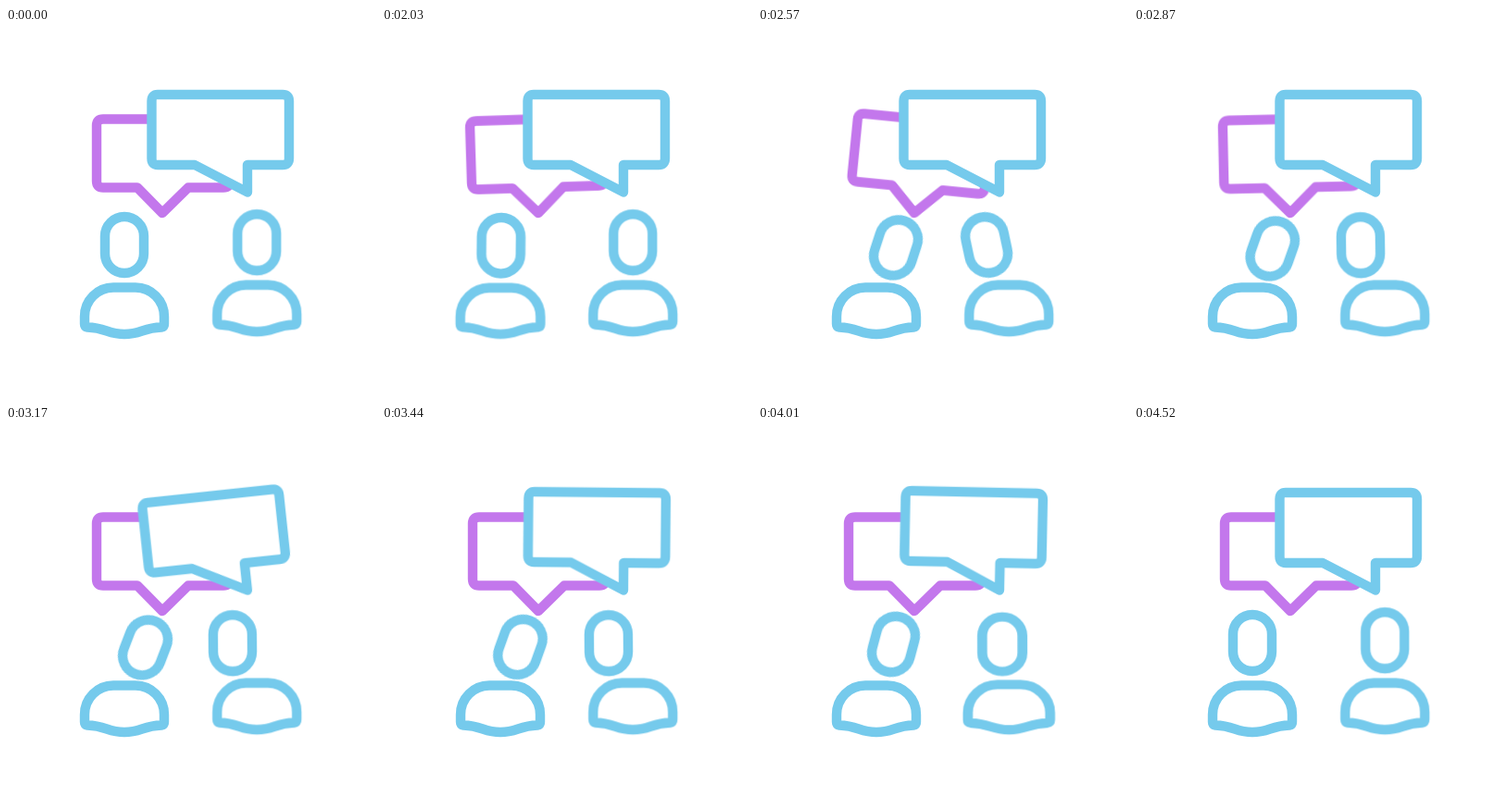
An HTML page that plays this animation: 400x400 px, repeating every 4550 ms.

```html
<!DOCTYPE html>
<html lang="en">
<head>
<meta charset="utf-8">
<title>Conversation</title>
<style>
  html, body { margin: 0; width: 100%; height: 100%; overflow: hidden; background: #fff; }
  svg { display: block; width: 100vw; height: 100vh; }
  .blue { stroke: #75caec; }
  .purple { stroke: #c377ec; }

  .anim { animation: 4550ms cubic-bezier(.333, 0, .667, 1) infinite; }
  .bubble.purple { transform-origin: 169px 200px; animation-name: swing-purple; }
  .bubble.blue { transform-origin: 261px 178px; animation-name: swing-blue; }
  .person { transform-origin: 128px 333px; }
  .left { animation-name: squash-left; }
  .right { animation-name: squash-right; }
  .head { transform-origin: 128px 234.5px; }
  .left .head { animation-name: lean-left; }
  .right .head { animation-name: lean-right; }

  @keyframes swing-purple {
    0%, 43.96% { transform: rotate(0deg); }
    47.63% { transform: rotate(-20deg); }
    53.96% { transform: rotate(14deg); }
    60.22% { transform: rotate(-9deg); }
    65.6% { transform: rotate(5deg); }
    69.12%, 100% { transform: rotate(0deg); }
  }
  @keyframes swing-blue {
    0%, 68.35% { transform: rotate(0deg); }
    72.02% { transform: rotate(-20deg); }
    78.35% { transform: rotate(14deg); }
    84.62% { transform: rotate(-9deg); }
    90% { transform: rotate(5deg); }
    93.52%, 100% { transform: rotate(0deg); }
  }
  @keyframes squash-left {
    0%, 43.96%, 49.67%, 88.57%, 95.16%, 100% { transform: scale(1, 1); }
    46.81%, 91.87% { transform: scale(1.045, .955); }
  }
  @keyframes squash-right {
    0%, 47.25%, 53.85%, 83.78%, 90.37%, 100% { transform: scale(1, 1); }
    50.55%, 87.08% { transform: scale(1.045, .955); }
  }
  @keyframes lean-left {
    0%, 43.96% { transform: translate(0px, 0px) rotate(0deg); }
    49.67% { transform: translate(19px, 2px) rotate(15.5deg); }
    56.48% { transform: translate(21px, 3px) rotate(18deg); }
    69.67% { transform: translate(22.5px, 5px) rotate(21deg); }
    72.53% { transform: translate(23.5px, 6.5px) rotate(23deg); }
    79.56%, 88.57% { transform: translate(18.5px, 1.5px) rotate(15deg); }
    95.16%, 100% { transform: translate(0px, 0px) rotate(0deg); }
  }
  @keyframes lean-right {
    0%, 47.25% { transform: translate(0px, 0px) rotate(0deg); }
    53.85% { transform: translate(-25.5px, 3px) rotate(-7deg); }
    57.14% { transform: translate(-24px, 2.7px) rotate(-12.5deg); }
    63.74%, 83.78% { transform: translate(-26.3px, 3px) rotate(-.5deg); }
    90.37%, 100% { transform: translate(0px, 0px) rotate(0deg); }
  }
</style>
</head>
<body>
<svg viewBox="0 0 400 400" fill="none" stroke-width="10.4" stroke-linejoin="round" stroke-linecap="round">
  <defs>
    <rect id="head" x="107" y="204" width="42" height="61" rx="21"/>
    <path id="body" d="M85 312 C85 294.500 99 280.500 116 280.500 H140 C157 280.500 171 294.500 171 312 V320 Q171 323 168 323.500 C148 324 146 331 128 331 C110 331 108 324 88 323.500 Q85 323 85 320 Z"/>
  </defs>

  <path class="anim bubble purple" fill="#fff" d="M105 98.500 H235 Q242 98.500 242 105.500 V165.500 Q242 172.500 235 172.500 H197 L169 200 L142 172.500 H105 Q98 172.500 98 165.500 V105.500 Q98 98.500 105 98.500 Z"/>
  <path class="anim bubble blue" fill="#fff" d="M164 72 H299 Q306 72 306 79 V141 Q306 148 299 148 H261 V177.500 L204 148 H164 Q157.500 148 157.500 141 V79 Q157.500 72 164 72 Z"/>

  <g class="blue">
    <g class="anim person left">
      <use href="#body"/>
      <g class="anim head"><use href="#head"/></g>
    </g>
    <g transform="translate(143.300 -2.700)">
      <g class="anim person right">
        <use href="#body"/>
        <g class="anim head"><use href="#head"/></g>
      </g>
    </g>
  </g>
</svg>
</body>
</html>
```
